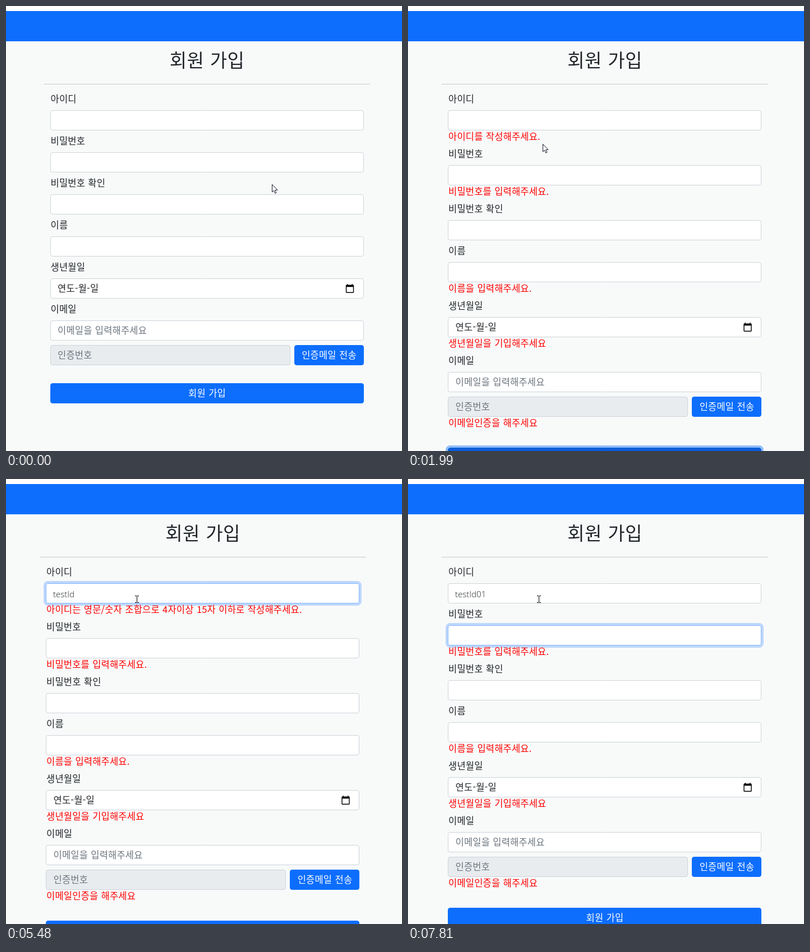
Recreate the animation shown at these times as an HTML page with a canvas. Size 706 by 794 pixels, loop 8 s.

```html
<!DOCTYPE html>
<html lang="ko">
<head>
<meta charset="utf-8">
<title>회원 가입</title>
<style>
html, body { margin: 0; width: 100%; height: 100%; overflow: hidden; background: #f8fafa; }
canvas { display: block; }
</style>
</head>
<body>
<canvas id="stage" width="706" height="794"></canvas>
<script>
const ctx = document.getElementById('stage').getContext('2d');
const LOOP = 8000, BLINK = 320, FADE = 150;
const HANGUL = '"Noto Sans CJK KR", "Noto Sans CJK", sans-serif';
const LATIN = '"Open Sans", sans-serif';
const INK = '#212529', MUTED = '#6c757d', RED = '#ff0000', BORDER = [206, 212, 218];
const BLUE = [13, 110, 253], HOVER = [11, 94, 215], ACTIVE = [10, 88, 202], FOCUS = [134, 183, 254];

// Times of the user's actions
const PRESS = 1140, RELEASE = 1310, ERRORS = 1350, FOCUS_ID = 2350, FOCUS_PW = 7490;

const EMPTY_ID = '아이디를 작성해주세요.';
const BAD_ID = '아이디는 영문/숫자 조합으로 4자이상 15자 이하로 작성해주세요.';

// Each entry: time, typed id, message under it
const typing = [
  [0, '', ''],
  [ERRORS, '', EMPTY_ID],
  [FOCUS_ID, '', EMPTY_ID],
  [3070, 't', BAD_ID],
  [3630, 'te', BAD_ID],
  [3830, 'tes', BAD_ID],
  [4040, 'test', BAD_ID],
  [4960, 'testI', BAD_ID],
  [5160, 'testId', BAD_ID],
  [5640, 'testId ', BAD_ID],
  [5890, 'testId', BAD_ID],
  [6130, 'testId1', ''],
  [6450, 'testId', BAD_ID],
  [7050, 'testId0', ''],
  [7210, 'testId01', ''],
  [FOCUS_PW, 'testId01', '']
];

// Each entry: start, end, from point, to point
const moves = [
  [430, 950, [474, 318], [401, 686]],
  [1350, 1790, [401, 686], [248, 281]],
  [1950, 2030, [248, 281], [233, 214]]
];

const rows = [
  { label: '아이디' },
  { label: '비밀번호', error: '비밀번호를 입력해주세요.' },
  { label: '비밀번호 확인' },
  { label: '이름', error: '이름을 입력해주세요.' },
  { label: '생년월일', error: '생년월일을 기입해주세요', value: '연도-월-일' },
  { label: '이메일', hint: '이메일을 입력해주세요' }
];

const calendar = new Path2D('M20 3h-1V1h-2v2H7V1H5v2H4c-1.1 0-2 .9-2 2v16c0 1.1.9 2 2 2h16c1.1 0 2-.9 2-2V5c0-1.1-.9-2-2-2zm0 18H4V8h16v13z');
const arrow = new Path2D('M.5 .5V14L3.6 11.2L5.7 16.2L7.9 15.2L5.8 10.4H10Z');

const clamp = v => Math.min(1, Math.max(0, v));
const lerp = (a, b, k) => a + (b - a) * k;
const ease = k => k * k * (3 - 2 * k);
const fade = (t, start) => ease(clamp((t - start) / FADE));
const mix = (a, b, k) => a.map((v, i) => lerp(v, b[i], k));
const rgb = c => `rgb(${c.map(Math.round)})`;

function text(str, x, y, color, { size = 16.5, align = 'left', family = HANGUL } = {}) {
  const hangul = family === HANGUL;
  ctx.font = `300 ${size}px ${family}`;
  ctx.letterSpacing = hangul ? size * 0.012 + 'px' : '0px';
  ctx.wordSpacing = hangul ? size * 0.085 + 'px' : '0px';
  ctx.textAlign = align;
  ctx.fillStyle = color;
  ctx.fillText(str, x, y + size * 0.37);
  return ctx.measureText(str).width;
}

function roundBox(x, y, w, h, r) {
  ctx.beginPath();
  ctx.roundRect(x, y, w, h, r);
}

function box(x, y, w, fill, border, ring, ringColor) {
  x = Math.floor(x);
  roundBox(x + 0.5, y + 0.5, w - 1, 35, 3.5);
  ctx.fillStyle = fill;
  ctx.fill();
  ctx.lineWidth = 1;
  ctx.strokeStyle = border;
  ctx.stroke();
  if (ring > 0) {
    ctx.globalAlpha = ring;
    ctx.lineWidth = 4;
    ctx.strokeStyle = ringColor;
    roundBox(x - 2, y - 2, w + 4, 40, 6);
    ctx.stroke();
    ctx.globalAlpha = 1;
  }
}

function field(x, y, focus) {
  box(x, y, 559, '#fff', rgb(mix(BORDER, FOCUS, focus)), focus * 0.25, rgb(BLUE));
}

function button(x, y, w, label, color, ring = 0) {
  box(x, y, w, color, color, ring * 0.5, 'rgb(49,132,253)');
  text(label, x + w / 2, y + 17.5, '#fff', { align: 'center' });
}

function caret(x, y) {
  ctx.fillStyle = '#000';
  ctx.fillRect(Math.floor(x), y + 8, 1, 20);
}

function pointer(t, fieldTops, submitTop) {
  let [x, y] = moves[0][2];
  for (const [start, end, from, to] of moves) {
    if (t >= start) [x, y] = mix(from, to, ease(clamp((t - start) / (end - start))));
  }
  x = Math.round(x);
  y = Math.round(y);
  const beam = [...fieldTops, submitTop].some(top => y >= top && y < top + 36);
  ctx.save();
  ctx.translate(x, y);
  if (beam) {
    ctx.globalCompositeOperation = 'difference';
    ctx.fillStyle = '#fff';
    ctx.fillRect(0, -5, 1, 11);
    for (const side of [-6, 6]) {
      ctx.fillRect(-3, side, 3, 1);
      ctx.fillRect(1, side, 3, 1);
    }
  } else {
    ctx.fillStyle = '#fff';
    ctx.fill(arrow);
    ctx.strokeStyle = '#15152c';
    ctx.lineWidth = 1;
    ctx.stroke(arrow);
  }
  ctx.restore();
}

function submitColor(t) {
  let c = mix(BLUE, HOVER, fade(t, 820));
  c = mix(c, ACTIVE, fade(t, PRESS) - fade(t, RELEASE));
  return rgb(mix(c, BLUE, fade(t, FOCUS_ID)));
}

function draw(t) {
  const [since, typed, idError] = typing.findLast(step => t >= step[0]);
  const failed = t >= ERRORS;
  const dx = failed ? -7.5 : 0;
  const left = 79 + dx;
  const blinkOn = Math.floor((t - since) / BLINK) % 2 === 0;
  const idFocus = fade(t, FOCUS_ID) - fade(t, FOCUS_PW);
  const focus = [idFocus, fade(t, FOCUS_PW)];

  ctx.fillStyle = '#f8fafa';
  ctx.fillRect(0, 0, 706, 794);
  ctx.fillStyle = '#fff';
  ctx.fillRect(0, 0, 706, 9);
  ctx.fillStyle = rgb(BLUE);
  ctx.fillRect(0, 9, 706, 54);
  text('회원 가입', 358.5 + dx, 97, INK, { size: 33, align: 'center' });
  ctx.fillStyle = '#c7c9ca';
  ctx.fillRect(Math.floor(67.5 + dx), 139, 582, 1);

  let y = 186;
  const tops = [];
  rows.forEach((row, i) => {
    tops.push(y);
    text(row.label, left + 0.5, y - 20, INK);
    field(left, y, focus[i] || 0);
    if (row.value) text(row.value, left + 13, y + 18, INK);
    if (row.hint) text(row.hint, left + 13, y + 18, MUTED);
    if (i === 0) {
      const width = text(typed, left + 12.5, y + 19, INK, { size: 15, family: LATIN });
      if (t >= FOCUS_ID && t < FOCUS_PW && blinkOn) caret(left + 12.5 + width, y);
    }
    if (i === 1 && t >= FOCUS_PW && blinkOn) caret(left + 13, y);
    if (row.value) {
      ctx.save();
      ctx.translate(604.4 + dx, y + 9.4);
      ctx.scale(0.72, 0.72);
      ctx.fillStyle = '#000';
      ctx.fill(calendar, 'evenodd');
      ctx.restore();
    }
    const error = i === 0 ? idError : failed && row.error;
    if (error) {
      text(error, left + 0.5, y + 47, RED);
      y += 23;
    }
    y += 75;
  });

  y -= 31;
  box(left, y, 428, '#e9ecef', rgb(BORDER));
  text('인증번호', left + 13, y + 18, MUTED);
  button(514 + dx, y, 124, '인증메일 전송', rgb(BLUE));
  if (failed) {
    text('이메일인증을 해주세요', left + 0.5, y + 47, RED);
    y += 23;
  }
  y += 68;
  button(left, y, 559, '회원 가입', submitColor(t), fade(t, PRESS) - fade(t, FOCUS_ID));
  pointer(t, tops, y);
}

const begin = performance.now();
function tick() {
  draw((performance.now() - begin) % LOOP);
  requestAnimationFrame(tick);
}
tick();
</script>
</body>
</html>
```
